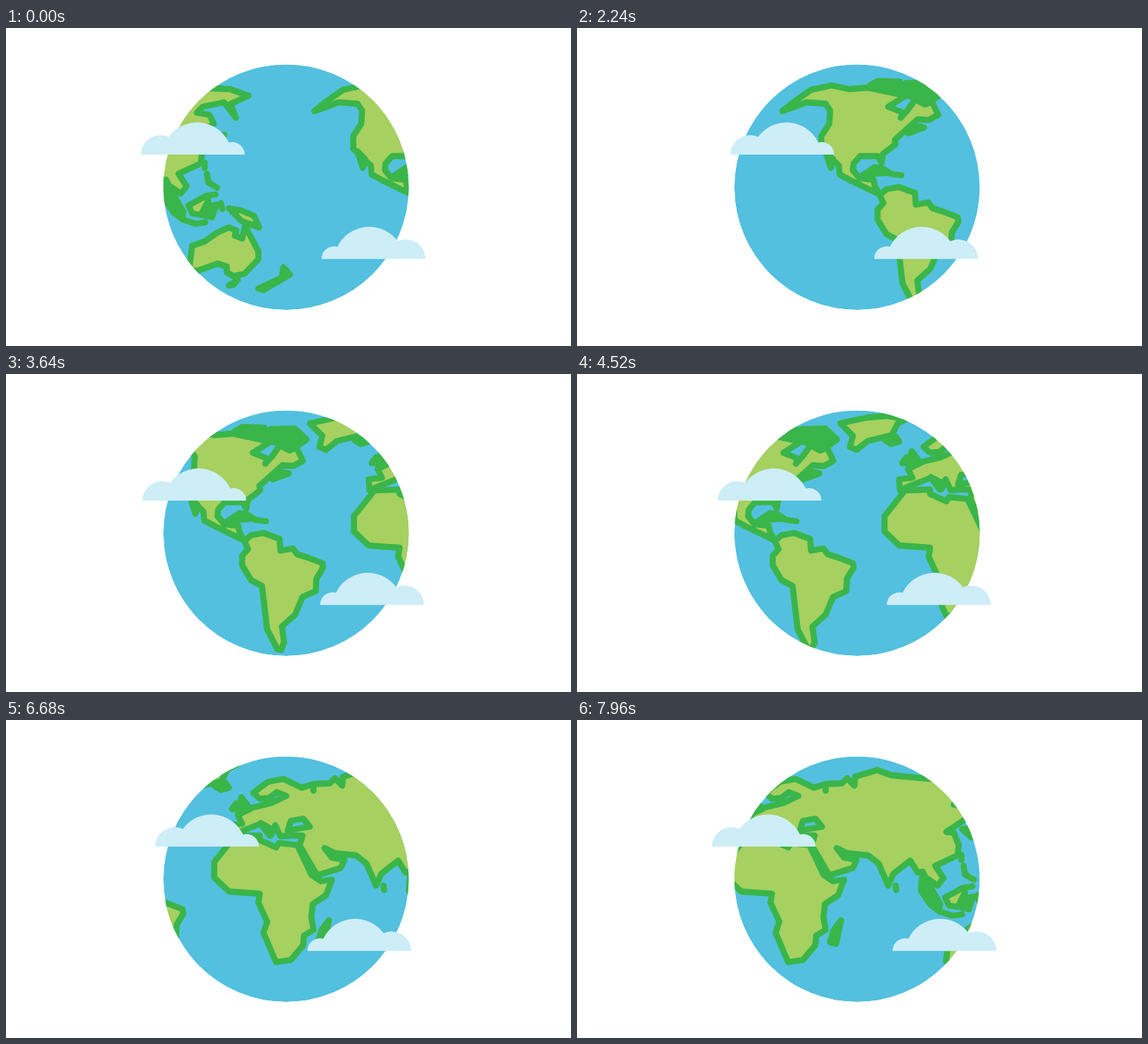
An HTML page for the animation above (8 s loop, 768x432 px).

```html
<!DOCTYPE html>
<html lang="en">
<head>
<meta charset="utf-8">
<title>Turning globe</title>
<style>
  html, body { margin: 0; width: 100%; height: 100%; overflow: hidden; background: #fff; }
  svg { display: block; width: 100vw; height: 100vh; }
  #map { fill: #a6d05f; stroke: #3ab54a; stroke-width: 8.3; stroke-linejoin: round; stroke-linecap: round; }
  .dense { fill: #3ab54a; }
  .sea { fill: #53c0df; }
</style>
</head>
<body>
<svg viewBox="0 0 768 432">
  <defs>
    <clipPath id="disc"><circle cx="380.7" cy="216.2" r="166.8"/></clipPath>

    <g id="map">
      <!-- North America -->
      <path d="M419,113 L452,101 478,103 484,112 483,130 472,147 472,164 496,187 497,199 512,207 551,226 545,215
        543,206 524,204 515,193 516,184 525,174 549,174 554,183 556,171 573,158 572,152 603,124 618,125 631,118 620,95
        613,104 600,97 589,112 580,122 583,115 563,107 587,92 535,81 510,83 486,78 458,84 434,101Z"/>
      <g class="dense">
        <path d="M478,168 L485,190 488,178Z"/>
        <path d="M524,203 L545,189 556,191 566,198 581,200"/>
        <path d="M590,143 L597,132 612,135Z"/>
        <path d="M538,78 L549,72 579,73 578,82Z"/>
        <path d="M578,88 L587,75 620,74 636,89 616,103 602,96Z"/>
      </g>

      <!-- South America -->
      <path transform="translate(227.5)" d="M324,227 L333,219 350,216 372,224 373,240 390,237 396,245 412,250 430,257
        431,263 422,278 421,295 403,303 393,327 375,343 378,364 374,375 369,374 355,347 348,288 333,280 321,260 321,247
        329,238Z"/>

      <!-- Greenland and Iceland -->
      <g transform="translate(282.5)">
        <path d="M358,67 L395,59 420,57 448,61 436,67 428,83 395,91 380,103 371,99 375,84Z"/>
        <path class="dense" d="M419,90 L433,85 438,92 427,95Z"/>
      </g>

      <g transform="translate(417.5)">
        <!-- Africa and Madagascar -->
        <path d="M311,158 L283,193 283,214 303,233 345,236 343,248 355,274 350,289 367,329 387,326 404,306 405,293
          418,285 415,268 417,250 435,238 443,217 428,219 415,210 396,170 371,167 367,173 345,163 345,157Z"/>
        <path d="M439,272 L429,285 424,302 432,304Z"/>

        <!-- Eurasia -->
        <path d="M304,158 L303,143 321,141 315,129 335,119 360,113 381,103 368,98 357,106 345,107 336,99 356,84 377,80
          402,92 418,87 418,96 418,87 440,86 447,79 457,89 458,77 488,68 507,75 560,80 637,83 662,92 638,103 645,122
          629,101 600,107 592,115 609,118 615,130 582,152 592,153 599,170 597,184 567,198 578,215 570,225 554,214
          563,232 550,206 543,207 533,191 510,209 503,225 490,195 476,184 447,181 433,174 443,187 460,190 455,201
          423,211 399,170 403,157 384,157 373,158 366,143 360,157 346,141 320,151Z"/>
        <path class="sea" d="M383,150 L387,137 404,134 413,145Z"/>
        <g class="dense">
          <path d="M346,140 L358,157 364,150Z"/>
          <path d="M307,121 L313,113 314,121Z"/>
          <path d="M320,105 L332,121 316,128Z"/>
          <path d="M513,225 L514,231"/>
        </g>
      </g>

      <!-- East Asian islands and Oceania -->
      <g transform="translate(750)">
        <g class="dense">
          <path d="M271,148 L284,160 297,145Z"/>
          <path d="M270,183 L270,190"/>
          <path d="M273,198 L275,210 287,217 M285,226 L272,228"/>
          <path d="M217,207 L241,250 240,260 228,251 215,232Z"/>
          <path d="M240,260 L258,266 271,264"/>
          <path d="M270,255 L274,242 286,240 280,257Z"/>
          <path d="M292,238 L294,246"/>
          <path d="M303,350 L315,342 309,349Z"/>
          <path d="M377,325 L386,335 350,356 343,354 375,339Z"/>
        </g>
        <path d="M248,241 L272,228 275,234 265,254 253,252Z"/>
        <path d="M303,245 L320,248 337,255 344,271 320,262Z"/>
        <path d="M253,296 L270,290 287,278 303,271 313,275 311,282 321,286 325,269 343,303 343,314 324,334 309,337
          300,332 300,324 288,320 260,330 249,328Z"/>
      </g>
    </g>

    <path id="cloud" fill="#cdedf7" d="M183.5,172 A26.5,26.5 0 0 1 221,148 A48,48 0 0 1 303,155.5 A17,17 0 0 1 324.5,172Z"/>
  </defs>

  <g clip-path="url(#disc)">
    <circle cx="380.7" cy="216.2" r="166.8" fill="#53c0df"/>
    <g id="world">
      <use href="#map"/>
      <use href="#map" x="-750"/>
    </g>
  </g>
  <use href="#cloud"/>
  <use href="#cloud" transform="translate(753.5 141.7) scale(-1 1)"/>
</svg>
<script>
  const LOOP = 8000, STEP = 40, SPEED = 0.0625, DRIFT = 26;
  const world = document.getElementById('world');
  const cloud = document.getElementById('cloud');

  const easeInOut = p => (1 - Math.cos(Math.PI * p)) / 2;
  const easeOut = p => Math.sin(Math.PI * p / 2);

  // Clouds swing in and back every 4 s; the second swing sets off more briskly.
  function drift(t) {
    const p = t / 2000;
    if (p > 2 && p < 3) return DRIFT * (0.4 * easeInOut(p - 2) + 0.6 * easeOut(p - 2));
    return DRIFT * easeInOut(p);
  }

  function draw() {
    const t = Math.floor((performance.now() % LOOP) / STEP) * STEP;
    world.setAttribute('transform', `translate(${-SPEED * t})`);
    cloud.setAttribute('transform', `translate(${drift(t)})`);
    requestAnimationFrame(draw);
  }
  draw();
</script>
</body>
</html>
```
